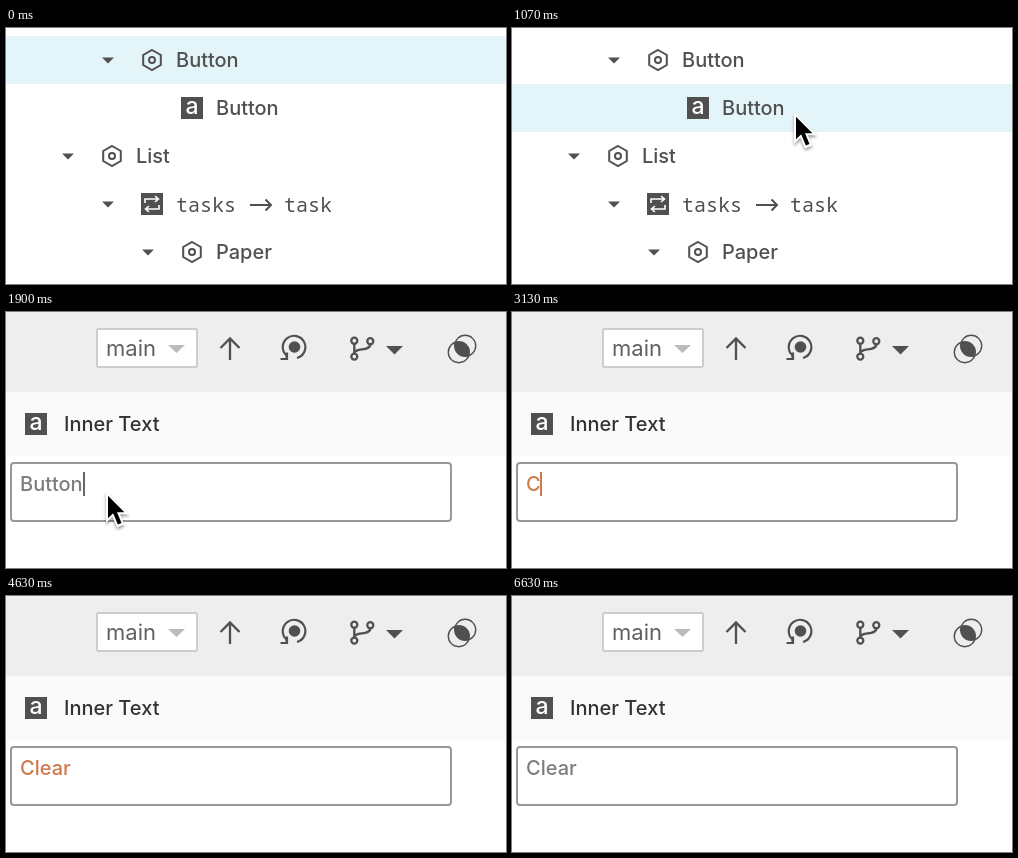
Animation of 500 by 256 pixels, one loop 6.8 s. Source, as an HTML page:

```html
<!DOCTYPE html>
<html lang="en">
<head>
<meta charset="utf-8">
<title>Editing a button label</title>
<style>
  html, body { margin: 0; width: 100%; height: 100%; overflow: hidden; background: #fff; }
  svg { display: block; width: 500px; height: 256px; }
  text { font: 500 20px Inter, sans-serif; fill: #505050; white-space: pre; }
  .mono { font: 400 20px "Noto Sans Mono", monospace; }
  .branch { font-size: 22px; font-weight: 400; fill: #606060; }
  .letter { font-size: 23px; fill: #fff; }
  .line { fill: none; stroke: #505050; stroke-width: 2; }
  .solid { fill: #505050; }
  #pointer { filter: drop-shadow(0 2px 1.5px rgba(0, 0, 0, .4)); }
</style>
</head>
<body>
<svg viewBox="0 0 500 256">
  <defs>
    <path id="fold" class="solid" d="M-6 -2.5H6L0 3.5Z"/>
    <g id="hex" class="line">
      <path d="M0 -10L8.8 -5V5L0 10L-8.8 5V-5Z"/>
      <circle r="3"/>
    </g>
    <g id="letter">
      <rect class="solid" x="-11" y="-11" width="22" height="22"/>
      <text class="letter" y="6" text-anchor="middle">a</text>
    </g>
    <g id="repeat">
      <rect class="solid" x="-11" y="-11" width="22" height="22"/>
      <path d="M-7 -1V-5H6M3 -8L6.5 -5L3 -2M7 1V5H-6M-3 2L-6.5 5L-3 8" fill="none" stroke="#fff" stroke-width="1.6"/>
    </g>
    <clipPath id="lens"><circle cx="452.8" cy="40.2" r="10.5"/></clipPath>
  </defs>

  <g id="tree">
    <rect id="hover" width="500" height="48" fill="#f0f9fb"/>
    <rect id="selected" width="500" height="48" fill="#e4f5fa"/>
    <g id="rows"></g>
    <path class="line" d="M244 177H265M259.5 171.5L265 177L259.5 182.5" stroke-width="1.8"/>
  </g>

  <g id="panel">
    <rect width="500" height="80" fill="#eee"/>
    <rect id="band" y="80" width="500" height="64"/>

    <rect x="91" y="17" width="100" height="38" rx="2" fill="#fff" stroke="#ccc" stroke-width="2"/>
    <text class="branch" x="100" y="44">main</text>
    <path d="M162 33H179L170.5 41Z" fill="#bbb"/>

    <path class="line" d="M224 48V26.5M214.5 36L224 26.5L233.5 36" style="stroke-width:2.3"/>

    <circle class="solid" cx="288.5" cy="35" r="5.8"/>
    <path class="line" d="M291 46A11.3 11.3 0 1 0 280.5 43.5V47M274.5 47H281V40.5" style="stroke-width:2.2"/>

    <g class="line" style="stroke-width:2.3">
      <circle cx="348.3" cy="28.7" r="3"/>
      <circle cx="364.3" cy="29.2" r="3"/>
      <circle cx="348.3" cy="44.6" r="3"/>
      <path d="M348.3 31.7V41.6M364.3 32.2C364.3 40 348.3 35 348.3 41.6"/>
    </g>
    <path class="solid" d="M380 34H397L388.5 42.5Z"/>

    <circle class="solid" cx="459.2" cy="33.8" r="10.5" clip-path="url(#lens)"/>
    <g class="line" style="stroke-width:1.4">
      <circle cx="452.8" cy="40.2" r="10.5"/>
      <circle cx="459.2" cy="33.8" r="10.5"/>
    </g>

    <use href="#letter" x="30" y="112"/>
    <text x="58" y="119" style="fill:#333">Inner Text</text>

    <rect x="5" y="151" width="440" height="58" rx="3" fill="#fff" stroke="#999" stroke-width="2"/>
    <rect id="marked" x="14" y="160" width="64" height="24" fill="#b3d7fd"/>
    <text id="value" x="14" y="179"></text>
    <rect id="caret" y="160" width="2" height="24"/>
  </g>

  <g id="pointer">
    <g transform="scale(2) translate(-8.2 -4.9)">
      <path d="M8.2 20.9V4.9L19.8 16.5H13L12.6 16.6Z" fill="#fff"/>
      <path d="M17.3 21.6L13.7 23.1L9 12L12.7 10.5Z" fill="#fff"/>
      <rect x="12.5" y="13.6" width="2" height="8" transform="matrix(.9221 -.3871 .3871 .9221 -5.7605 6.5909)"/>
      <path d="M9.2 7.3V18.5L12.2 15.6L12.6 15.5H17.4Z"/>
    </g>
  </g>
</svg>

<script>
const LOOP = 6800, TICK = 100 / 3;
const CUT = 1665, SELECT = 2470, TYPE = 3130, SAVE = 5330;
const ROW = 48, TOP = 8;
const GREY = '#7d7d7d', ORANGE = '#cf7a4a';
const el = id => document.getElementById(id);

// icon, indent level, label
const rows = [
  ['hex', 1, 'Button'],
  ['letter', 2, 'Button'],
  ['hex', 0, 'List'],
  ['repeat', 1, 'tasks    task'],
  ['hex', 2, 'Paper']
];
el('rows').innerHTML = rows.map(([icon, level, label], i) => {
  const x = 40 * level, y = 32 + ROW * i, mono = icon === 'repeat';
  const fold = icon === 'letter' ? '' : `<use href="#fold" x="${62 + x}" y="${y}"/>`;
  return `${fold}<use href="#${icon}" x="${106 + x}" y="${y}"/>
    <text x="${130 + x}" y="${y + (mono ? 8 : 7)}"${mono ? ' class="mono"' : ''}>${label}</text>`;
}).join('');

// time of each keystroke, text so far, caret position
const typed = [
  [0, 'Button', 77],
  [TYPE, 'C', 28],
  [3500, 'Cl', 34],
  [3800, 'Cle', 45],
  [4100, 'Clea', 57],
  [4400, 'Clear', 64.5]
];
const toggles = [1900, 2130, 2400, SELECT, TYPE, 3400, 3500, 3770, 3800, 4070, 4100, 4370,
  4400, 4630, 4900, 5130, 5400, 5630, 5900, 6130, 6400, 6630];

const show = (id, on) => el(id).setAttribute('display', on ? 'inline' : 'none');
const set = (id, name, value) => el(id).setAttribute(name, value);
const unit = (t, from, to) => Math.min(1, Math.max(0, (t - from) / (to - from)));
const bend = (u, a, b, c) => a.map((v, i) =>
  (1 - u) * (1 - u) * v + 2 * u * (1 - u) * b[i] + u * u * c[i]);

function pointerAt(t) {
  if (t < 495 || t >= TYPE) return null;
  const s = Math.floor((t + 5) / TICK) * TICK;
  if (t >= CUT) return bend(unit(s, 1666, 1767), [162, 214], [120, 150], [100, 179]);
  if (s < 1440) {
    const u = unit(s, 500, 800);
    return bend(1 - (1 - u) * (1 - u), [104, 222], [220, 150], [282, 84]);
  }
  const u = unit(s, 1433.3, 1633.3);
  return bend(u * u * (3 - 2 * u), [282, 84], [380, 76], [470, 48]);
}

function draw(t) {
  const inTree = t < CUT, pos = pointerAt(t);
  show('tree', inTree);
  show('panel', !inTree);
  show('pointer', pos);
  if (pos) set('pointer', 'transform', `translate(${pos[0]} ${pos[1]})`);

  if (inTree) {
    const row = pos ? Math.floor((pos[1] + 2 - TOP) / ROW) : -1;
    show('hover', pos && pos[0] < 440);
    set('hover', 'y', TOP + ROW * row);
    set('selected', 'y', TOP + (t < 1070 ? 0 : ROW));
    return;
  }

  const [, text, x] = typed.filter(k => k[0] <= t).pop();
  const color = t >= TYPE && t < SAVE ? ORANGE : GREY;
  el('value').textContent = text;
  el('value').style.fill = color;
  set('band', 'fill', t >= SAVE && t < 5370 ? '#e4f5fa' : '#fafafa');
  show('marked', t >= SELECT && t < TYPE);
  show('caret', toggles.filter(k => k <= t).length % 2);
  set('caret', 'x', x);
  set('caret', 'fill', color === GREY ? '#666' : color);
}

const start = performance.now();
function frame() {
  draw((performance.now() - start) % LOOP);
  requestAnimationFrame(frame);
}
frame();
</script>
</body>
</html>
```
